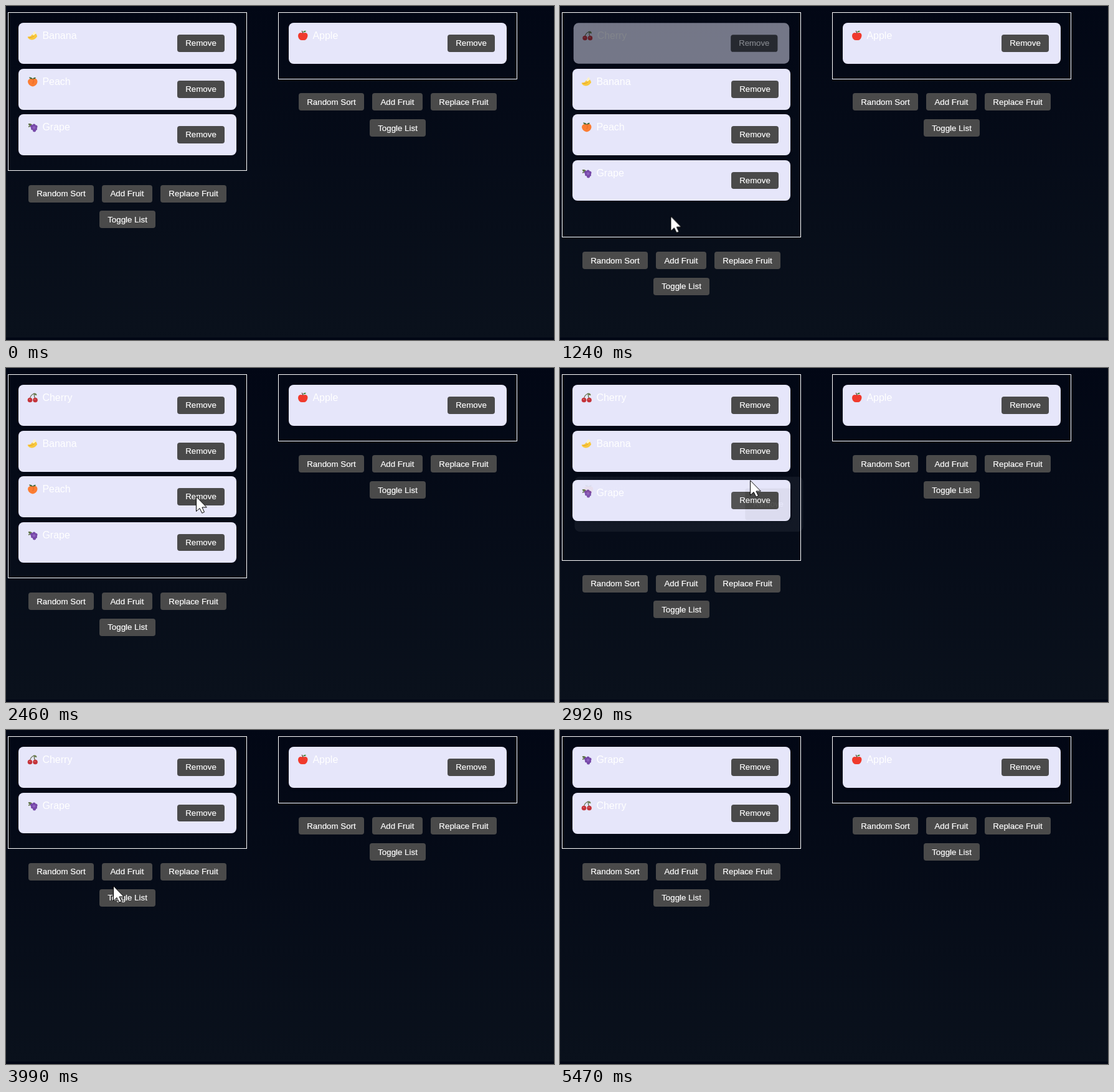
Recreate the animation shown at these times as an HTML page. Size 880x537 px, loop 6.02 s.

```html
<!DOCTYPE html>
<html lang="en">
<head>
<meta charset="utf-8">
<title>Fruit lists</title>
<style>
  html, body { margin: 0; width: 100%; height: 100%; overflow: hidden; }
  body {
    position: relative;
    background: linear-gradient(#020715, #0a111c) 0 0 / 100% 533px;
    color: #fff;
    font: 16px/18px "Liberation Sans", Arial, sans-serif;
  }
  .column { position: absolute; top: 10px; left: 3px; width: 384px; }
  .column + .column { left: 437px; }

  .list {
    position: relative; box-sizing: border-box; height: 254.8px;
    margin: 0; padding: 0; border: 1px solid #fff; list-style: none;
  }
  .short { height: 107.6px; }
  .item {
    position: absolute; left: 16px; top: 16px; box-sizing: border-box;
    width: 350px; height: 65.6px; padding: 12px 12px 12px 38.4px;
    border-radius: 8px; background: #e6e6fa;
    box-shadow: 0 2px 4px rgba(0, 0, 0, .1);
  }
  .item svg { position: absolute; left: 14px; top: 12px; width: 17px; height: 17px; }

  button {
    position: absolute; height: 28px; padding: 0; border: 0; border-radius: 4px;
    background: #4a4a4a; color: #fff;
    font: 500 13.333px "Liberation Sans", Arial, sans-serif;
    -webkit-text-stroke: .2px #fff;
  }
  .item button { top: 19px; right: 19px; bottom: 19px; width: 76px; height: auto; }
  .tools { position: relative; top: 22.8px; }
  .sort { left: 33px; width: 105px; }
  .add { left: 151px; width: 81px; }
  .swap { left: 245px; width: 106px; }
  .toggle { left: 147px; top: 41.8px; width: 90px; }

  /* rows of the list */
  @keyframes row0 { to { top: 16px; } }
  @keyframes row1 { to { top: 89.6px; } }
  @keyframes row2 { to { top: 163.2px; } }
  @keyframes row3 { to { top: 236.8px; } }
  @keyframes drop { from { z-index: 1; } to { top: 89.6px; z-index: 1; } }
  @keyframes enter {
    from { opacity: 0; transform: scale(.98); }
    to { opacity: 1; transform: none; }
  }
  @keyframes leave {
    from { width: 374px; height: 89.6px; z-index: 1; opacity: 1; transform: none; }
    to { width: 374px; height: 89.6px; z-index: 1; opacity: 0; transform: scale(.98); }
  }

  /* resting heights, and the taller heights passed through on the way */
  @keyframes fit4 { from, to { height: 328.4px; } }
  @keyframes fit3 { from, to { height: 254.8px; } }
  @keyframes fit2 { from, to { height: 181.2px; } }
  @keyframes grow { from { height: 288.8px; } to { height: 362.4px; } }
  @keyframes shrink4 { from { height: 362.4px; } to { height: 288.8px; } }
  @keyframes shrink3 { from { height: 288.8px; } to { height: 215.2px; } }

  .fruits {
    animation:
      fit4 1ms 990ms forwards, grow 250ms ease-in-out 990ms,
      fit3 1ms 2740ms forwards, shrink4 250ms ease-in-out 2740ms,
      fit2 1ms 3450ms forwards, shrink3 250ms ease-in-out 3450ms;
  }
  .cherry {
    opacity: 0;
    animation: enter 375ms ease-in 983ms forwards, drop 250ms ease-in-out 4470ms forwards;
  }
  .banana {
    animation: row1 250ms ease-in-out 983ms forwards, leave 250ms ease-out 3445ms forwards;
  }
  .peach {
    top: 89.6px;
    animation: row2 250ms ease-in-out 983ms forwards, leave 250ms ease-out 2723ms forwards;
  }
  .grape {
    top: 163.2px;
    animation:
      row3 250ms ease-in-out 983ms forwards, row2 250ms ease-in-out 2723ms forwards,
      row1 250ms ease-in-out 3443ms forwards, row0 250ms ease-in-out 4470ms forwards;
  }

  .cursor {
    position: absolute; left: 0; top: 0; z-index: 2; width: 18px; height: 28px;
    overflow: visible; visibility: hidden;
    animation: show 5290ms 150ms, travel 6020ms ease-in-out forwards;
  }
  @keyframes show { from, to { visibility: visible; } }
  @keyframes travel {
    0%, 2.5% { transform: translate(737px, 498px); }
    11.5%, 16.7% { transform: translate(184px, 301px); }
    23%, 25.6% { transform: translate(174px, 356px); }
    26.7%, 27% { transform: translate(180px, 357px); }
    35.7% { transform: translate(299px, 189px); }
    37%, 38.4% { transform: translate(299px, 188px); }
    39.6% { transform: translate(304px, 213px); }
    40.8%, 44.8% { transform: translate(305px, 206px); }
    48.5% { transform: translate(305px, 180px); }
    53.6%, 57.6% { transform: translate(313px, 129px); }
    66.4% { transform: translate(172px, 250px); }
    70.3%, 76.6% { transform: translate(120px, 226px); }
    85.6% { transform: translate(754px, 405px); animation-timing-function: linear; }
    88.2% { transform: translate(766px, 470px); animation-timing-function: linear; }
    89.4%, 100% { transform: translate(713px, 506px); }
  }
</style>
</head>
<body>
<svg width="0" height="0" style="position:absolute">
  <symbol id="banana" viewBox="0 0 17 17">
    <path d="M8 8.5Q9.500 3 12 1.500Q14.500 3 13 8Z" fill="#fff3c4"/>
    <path d="M1 10Q6 11 8 6.500L10 8.500L14 5.500Q15.500 6 15 8Q16.500 8 16 10Q13 15 7.500 15.500Q3 15 1 12Z" fill="#f8c83c"/>
    <path d="M3 11.500Q8 12.500 11 9" fill="none" stroke="#e3a32b"/>
  </symbol>
  <symbol id="peach" viewBox="0 0 17 17">
    <path d="M9 3.500Q16.500 2.500 16.500 9Q15.500 15 9 16.500Q2 15 1 9Q1 3 9 3.500Z" fill="#fb7d33"/>
    <path d="M9 4Q11.500 8 9 12" fill="none" stroke="#de6224" stroke-width=".8"/>
    <path d="M9 4.500Q4 5 3 1.500Q7.500 1 9 4.500Q10 1 14 2Q13 5 9 4.500Z" fill="#3f6b3c"/>
  </symbol>
  <symbol id="grape" viewBox="0 0 17 17">
    <path d="M7 5Q4 3 2 4M2 8Q5 8 7 4" fill="none" stroke="#56633f" stroke-width="1.500"/>
    <path d="M2 5Q5 2 8 5Q5 8 2 5Z" fill="#5d7844"/>
    <g fill="#7648a8">
      <circle cx="7.500" cy="7.500" r="2.500"/><circle cx="11" cy="6" r="2.500"/>
      <circle cx="14" cy="8" r="2.500"/><circle cx="8.500" cy="11" r="2.500"/>
      <circle cx="13.500" cy="11.500" r="2.500"/><circle cx="11.500" cy="14" r="2.500"/>
    </g>
    <circle cx="11" cy="9.500" r="2.300" fill="#8e60c0"/>
  </symbol>
  <symbol id="cherry" viewBox="0 0 17 17">
    <path d="M4.500 10Q5 5 11 2Q11 7 13 10" fill="none" stroke="#5f6b45" stroke-width="1.200"/>
    <path d="M10.500 2Q15 0 15.500 5Q11.500 5.500 10.500 2Z" fill="#6b7e4e"/>
    <circle cx="4.500" cy="12.500" r="3.800" fill="#c4343a"/>
    <circle cx="13" cy="12.500" r="3.800" fill="#c4343a"/>
    <path d="M3 11.500h2M11.500 11.500h2" stroke="#e2777a"/>
  </symbol>
  <symbol id="apple" viewBox="0 0 17 17">
    <path d="M9 4.500Q16.500 2.500 16.500 9Q15 17 9 16Q2 17 1 9.500Q1 2.500 9 4.500Z" fill="#f03a2c"/>
    <path d="M9 5Q8.500 2.500 7 1" fill="none" stroke="#6b4032" stroke-width="1.300"/>
    <path d="M9 3Q10 0 14 1Q13 4 9 3Z" fill="#4c8a3d"/>
  </symbol>
</svg>

<div class="column">
  <ul class="list fruits">
    <li class="item cherry"><svg><use href="#cherry"/></svg>Cherry<button>Remove</button></li>
    <li class="item banana"><svg><use href="#banana"/></svg>Banana<button>Remove</button></li>
    <li class="item peach"><svg><use href="#peach"/></svg>Peach<button>Remove</button></li>
    <li class="item grape"><svg><use href="#grape"/></svg>Grape<button>Remove</button></li>
  </ul>
  <div class="tools">
    <button class="sort">Random Sort</button>
    <button class="add">Add Fruit</button>
    <button class="swap">Replace Fruit</button>
    <button class="toggle">Toggle List</button>
  </div>
</div>

<div class="column">
  <ul class="list short">
    <li class="item"><svg><use href="#apple"/></svg>Apple<button>Remove</button></li>
  </ul>
  <div class="tools">
    <button class="sort">Random Sort</button>
    <button class="add">Add Fruit</button>
    <button class="swap">Replace Fruit</button>
    <button class="toggle">Toggle List</button>
  </div>
</div>

<svg class="cursor" viewBox="0 0 18 28">
  <path d="M.5 .8V24.500L6 19.500L9.800 27.300L13.500 25.600L9.900 18H17.300Z" fill="#fff" stroke="#000"/>
</svg>

<script>
  // Drive every CSS animation from one looping clock that ticks 13 times a second.
  const LOOP = 6020;
  const STEP = 1000 / 13;
  const LEAD = 14;
  const animations = document.getAnimations();
  const start = performance.now();
  animations.forEach(a => a.pause());

  function draw() {
    const time = (performance.now() - start) % LOOP;
    const shown = Math.floor((time + LEAD) / STEP) * STEP;
    animations.forEach(a => { a.currentTime = shown; });
    requestAnimationFrame(draw);
  }
  draw();
</script>
</body>
</html>
```
